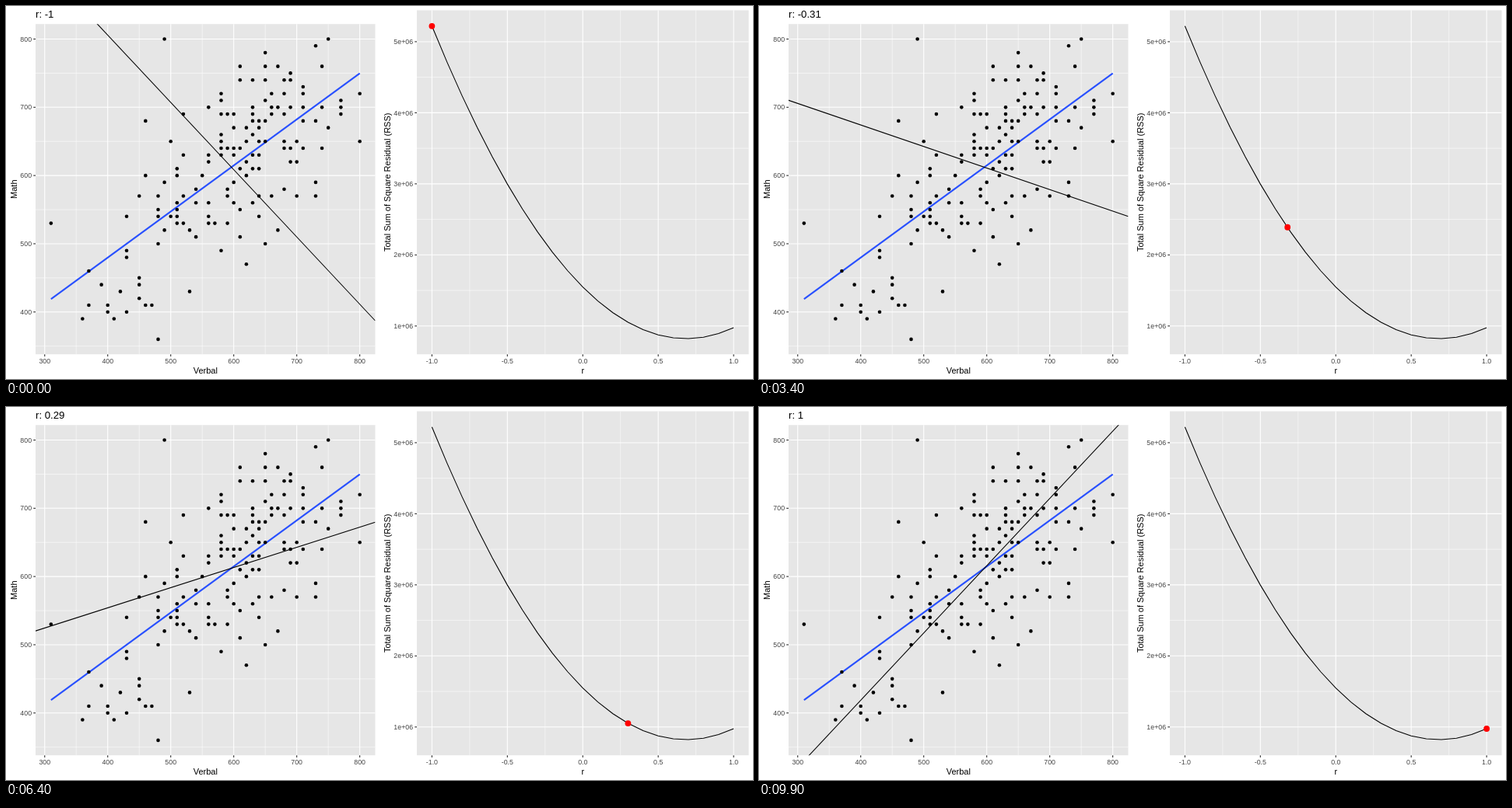
Recreate the animation shown at these times as an HTML page with a canvas. Size 960x480 px, loop 10 s.

```html
<!DOCTYPE html>
<html lang="en">
<head>
<meta charset="utf-8">
<title>Correlation and residuals</title>
<style>
  html, body { margin: 0; width: 100%; height: 100%; overflow: hidden; background: #fff; }
  canvas { display: block; }
</style>
</head>
<body>
<canvas id="stage" width="960" height="480"></canvas>
<script>
const ctx = document.getElementById('stage').getContext('2d');
const FRAMES = 100, FRAME_MS = 100, STATES = 20;
const FONT = '"Liberation Sans", Arial, sans-serif';
const THIN = 1.07;

// Math scores for each verbal score, both in tens, verbal rising from 31
const scores = [
  [53], [], [], [], [], [39], [41, 46], [], [44],
  [40, 41], [39], [43], [40, 48, 49, 54], [], [42, 44, 45, 57], [41, 60, 68], [41],
  [36, 50, 54, 55, 57], [52, 59, 80],
  [54, 65], [53, 54, 55, 56, 60, 61], [53, 57, 63, 69], [43, 52], [51, 56, 58],
  [60], [53, 54, 56, 62, 63, 70], [53], [49, 63, 64, 65, 66, 69, 71, 72],
  [53, 57, 58, 64, 69],
  [56, 59, 63, 64, 67, 69], [51, 55, 61, 64, 74, 76], [47, 60, 62, 65, 67],
  [56, 61, 63, 66, 68, 69, 70, 74], [54, 57, 61, 63, 65, 67, 68],
  [50, 65, 68, 71, 74, 76, 78], [57, 69, 70, 72], [52, 70, 76],
  [58, 64, 65, 69, 72, 74], [62, 64, 70, 74, 75],
  [57, 62, 65], [64, 68, 70, 72, 73], [], [57, 59, 68, 79], [64, 70, 76], [67, 80],
  [], [69, 70, 71], [], [], [65, 72]
];

const meanX = 596.3, meanY = 612.2, sdRatio = 0.986, bestR = 0.685;
const fit = (x, r) => meanY + r * sdRatio * (x - meanX);
const rss = r => 1.549 * (1 - 2 * bestR * r + r * r);   // in millions

const range = (from, to, step) =>
  Array.from({ length: Math.round((to - from) / step) + 1 }, (_, i) => from + i * step);

function makePanel(left, top, right, bottom, x0, x1, y0, y1) {
  return {
    left, top, right, bottom, x0, x1,
    x: v => left + (v - x0) / (x1 - x0) * (right - left),
    y: v => bottom - (v - y0) / (y1 - y0) * (bottom - top)
  };
}
const scatter = makePanel(38, 23.2, 474.5, 448.2, 285.5, 824.5, 338, 822);
const curve = makePanel(528, 5.5, 954.5, 448.2, -1.1, 1.1, 0.602, 5.442);

function line(points, color, width) {
  ctx.beginPath();
  points.forEach(p => ctx.lineTo(...p));
  ctx.strokeStyle = color;
  ctx.lineWidth = width;
  ctx.stroke();
}

function dot(x, y, radius, color) {
  ctx.beginPath();
  ctx.arc(x, y, radius, 0, 2 * Math.PI);
  ctx.fillStyle = color;
  ctx.fill();
}

function text(str, x, y, size, align, color = '#000', angle = 0) {
  ctx.save();
  ctx.translate(x, y);
  ctx.rotate(angle);
  ctx.font = `${size}px ${FONT}`;
  ctx.textAlign = align;
  ctx.fillStyle = color;
  ctx.fillText(str, 0, 0);
  ctx.restore();
}

function drawPanel(p, xs, ys, xMinor, yMinor, xLabel, yLabel, xTitle, yTitle, yTitleX) {
  const vertical = (v, width) => line([[p.x(v), p.top], [p.x(v), p.bottom]], '#fff', width);
  const horizontal = (v, width) => line([[p.left, p.y(v)], [p.right, p.y(v)]], '#fff', width);
  ctx.fillStyle = '#e6e6e6';
  ctx.fillRect(p.left, p.top, p.right - p.left, p.bottom - p.top);
  xMinor.forEach(v => vertical(v, THIN / 2));
  yMinor.forEach(v => horizontal(v, THIN / 2));
  for (const v of xs) {
    vertical(v, THIN);
    line([[p.x(v), p.bottom], [p.x(v), p.bottom + 2.75]], '#2a2a2a', THIN);
    text(xLabel(v), p.x(v), 459.6, 8.8, 'center', '#444');
  }
  for (const v of ys) {
    horizontal(v, THIN);
    line([[p.left - 2.75, p.y(v)], [p.left, p.y(v)]], '#2a2a2a', THIN);
    text(yLabel(v), p.left - 4.95, p.y(v) + 3.15, 8.8, 'right', '#444');
  }
  text(xTitle, (p.left + p.right) / 2, 473, 11, 'center');
  text(yTitle, yTitleX, (p.top + p.bottom) / 2, 11, 'center', '#000', -Math.PI / 2);
}

// States fall on whole frames; values between them are interpolated linearly
const stateFrame = k => Math.ceil((FRAMES - 1) * k / STATES - 0.5);
const stateR = k => -1 + 2 * k / STATES;

function pose(frame) {
  let k = 0;
  while (k < STATES - 1 && stateFrame(k + 1) <= frame) k++;
  const u = (frame - stateFrame(k)) / (stateFrame(k + 1) - stateFrame(k));
  const mix = f => f(stateR(k)) * (1 - u) + f(stateR(k + 1)) * u;
  return { r: mix(r => r), loss: mix(rss) };
}

function drawScatter(r) {
  const p = scatter;
  drawPanel(p, range(300, 800, 100), range(400, 800, 100),
    range(350, 750, 100), range(350, 750, 100), String, String, 'Verbal', 'Math', 13.5);
  const fitLine = (from, to, slope) => [from, to].map(x => [p.x(x), p.y(fit(x, slope))]);
  line(fitLine(310, 800, bestR), '#2850ff', 2.13);
  scores.forEach((column, i) =>
    column.forEach(s => dot(p.x(310 + 10 * i), p.y(10 * s), 2.3, '#000')));
  ctx.save();
  ctx.beginPath();
  ctx.rect(p.left, p.top, p.right - p.left, p.bottom - p.top);
  ctx.clip();
  line(fitLine(p.x0, p.x1, r), '#000', THIN);
  ctx.restore();
}

function drawCurve(r, loss) {
  const p = curve;
  drawPanel(p, range(-1, 1, 0.5), range(1, 5, 1),
    range(-0.75, 0.75, 0.5), range(1.5, 4.5, 1),
    v => v.toFixed(1), v => `${v}e+06`, 'r', 'Total Sum of Square Residual (RSS)', 494);
  line(range(0, STATES, 1).map(k => [p.x(stateR(k)), p.y(rss(stateR(k)))]), '#000', THIN);
  dot(p.x(r), p.y(loss), 3.9, '#ff0000');
}

function draw(now) {
  const frame = Math.floor(now / FRAME_MS) % FRAMES;
  const { r, loss } = pose(frame);
  const shownR = -1 + 2 * frame / (FRAMES - 1);
  ctx.fillStyle = '#fff';
  ctx.fillRect(0, 0, 960, 480);
  drawScatter(r);
  drawCurve(r, loss);
  text(`r: ${+shownR.toFixed(2)}`, scatter.left, 15, 13.2, 'left');
  requestAnimationFrame(draw);
}
requestAnimationFrame(draw);
</script>
</body>
</html>
```
